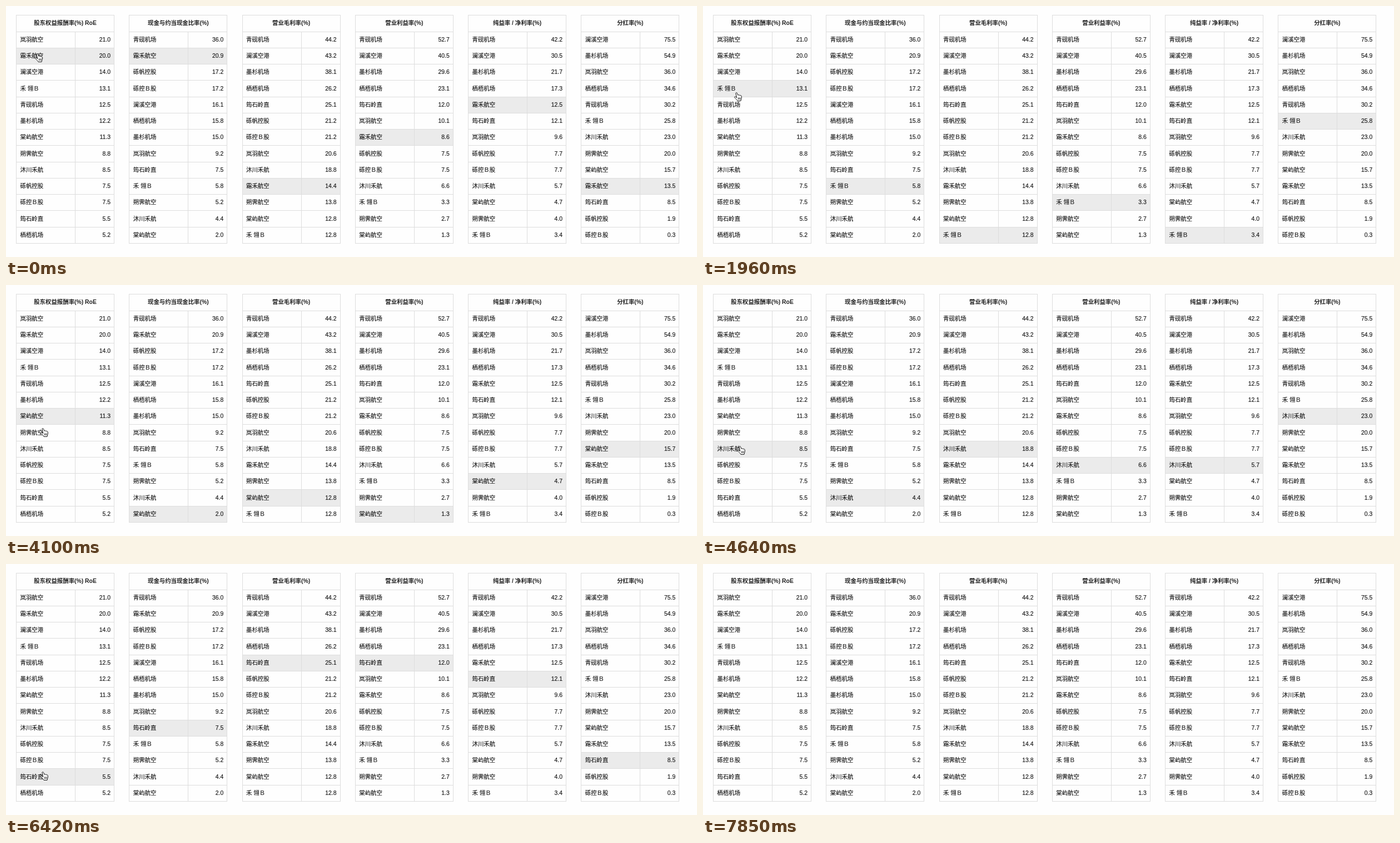
Write an HTML page that moves like this. It is 1243 px wide and 451 px high and loops after 8590 ms.

```html
<!DOCTYPE html>
<html lang="zh-CN">
<head>
<meta charset="utf-8">
<title>财务比率对比</title>
<style>
  html, body { margin: 0; width: 100%; height: 100%; overflow: hidden; background: #fefefe; }
  svg { display: block; }
  text {
    font: 10.4px "Liberation Sans", "Noto Sans CJK SC", "Noto Sans CJK", sans-serif;
    fill: #161616; stroke: #161616; stroke-width: 0.15;
  }
  .head { font-weight: 700; text-anchor: middle; fill: #222; stroke: none; }
  .num { text-anchor: end; }
  .line { fill: #ddd; }
  .hover { fill: #ebebeb; }
</style>
</head>
<body>
<svg id="stage" width="1243" height="451" viewBox="0 0 1243 451"></svg>
<script>
const LOOP = 8590, TICK = 178.1;
const PITCH = 29.25, WIDTH = 176, SPLIT = 106;

const titles = ['股东权益报酬率(%) RoE', '现金与约当现金比率(%)', '营业毛利率(%)',
  '营业利益率(%)', '纯益率 / 净利率(%)', '分红率(%)'];

// One company per line, one ratio per table; each table sorts by its own ratio.
const companies = `岚羽航空|21.0 9.2 20.6 10.1 9.6 36.0
霜禾航空|20.0 20.9 14.4 8.6 12.5 13.5
澜溪空港|14.0 16.1 43.2 40.5 30.5 75.5
禾 翎Ｂ|13.1 5.8 12.8 3.3 3.4 25.8
青砚机场|12.5 36.0 44.2 52.7 42.2 30.2
墨杉机场|12.2 15.0 38.1 29.6 21.7 54.9
棠屿航空|11.3 2.0 12.84 1.3 4.7 15.7
朔霁航空|8.8 5.2 13.8 2.7 4.0 20.0
沐川禾航|8.5 4.4 18.8 6.6 5.7 23.0
砾帆控股|7.5 17.2 21.2 7.5 7.7 1.9
砾控Ｂ股|7.5 17.2 21.2 7.5 7.7 0.3
筠石岭直|5.5 7.5 25.1 12.0 12.1 8.5
栖梧机场|5.2 15.8 26.2 23.1 17.3 34.6`.split('\n').map(line => {
  const [name, ratios] = line.split('|');
  return { name, ratios: ratios.split(' ').map(Number) };
});
const ROWS = companies.length;

// Pointer path: [tick, y], straight between the points.
const path = [[0, 86], [1, 88], [2, 88], [8, 147], [9, 147], [11, 156], [13, 183], [16, 183],
  [17, 185], [21, 238], [22, 238], [23, 258], [25, 282], [26, 290], [35, 370], [36, 374],
  [40, 411], [41, 411], [44, 470]];

const stage = document.getElementById('stage');

function add(tag, attrs, parent = stage, text = '') {
  const el = document.createElementNS('http://www.w3.org/2000/svg', tag);
  for (const key in attrs) el.setAttribute(key, attrs[key]);
  el.textContent = text;
  parent.append(el);
  return el;
}
const rect = (cls, x, y, width, height) => add('rect', { class: cls, x, y, width, height });
const label = (cls, x, y, text) => add('text', { class: cls, x, y }, stage, text);
const lineY = row => Math.round(45.5 + PITCH * row);

const tables = titles.map((title, i) => {
  const left = 18.2 + 203.25 * i, x = Math.round(left);
  const top = lineY(-1), bottom = lineY(ROWS);
  const order = [...companies].sort((a, b) => b.ratios[i] - a.ratios[i]);
  const bar = rect('hover', x + 1, 0, WIDTH - 1, 0);
  for (let row = -1; row <= ROWS; row++) rect('line', x, lineY(row), WIDTH + 1, 1);
  for (const dx of [0, WIDTH]) rect('line', x + dx, top, 1, bottom - top + 1);
  rect('line', x + SPLIT, lineY(0), 1, bottom - lineY(0));

  label('head', left + WIDTH / 2 + 0.4, 34.4, title);
  order.forEach((company, row) => {
    const y = Math.round(63.9 + PITCH * row);
    label('name', left + 7.4, y, company.name);
    label('num', left + 169.8, y, company.ratios[i].toFixed(1));
  });
  return { bar, order };
});

const hand = add('g', { stroke: '#111', 'stroke-width': 1, 'stroke-linejoin': 'round', 'stroke-linecap': 'round' });
add('path', {
  fill: '#fff',
  d: 'M3 1.6C3.1.3 5 .2 5.5 1.5L6.9 5.3C7.5 4.5 8.8 4.6 9.2 5.5C9.8 4.8 11 5.1 11.3 6.1' +
     'C12.2 5.6 13.2 6.1 13.3 7.2V10C13.3 12 12.1 13.2 12 15.4H6C5.6 13.8 3.6 12.4.9 9.5' +
     'C.1 8.4 1.3 7.3 2.4 8L4.4 9.4Z'
}, hand);
add('path', { fill: 'none', 'stroke-width': 0.8, d: 'M7.4 9.8V12.8M9.2 9.8V12.8M11 9.8V12.8' }, hand);

function pointerY(tick) {
  const next = path.findIndex(point => point[0] > tick);
  if (next < 0) return path[path.length - 1][1];
  const [t0, y0] = path[next - 1], [t1, y1] = path[next];
  return y0 + (y1 - y0) * (tick - t0) / (t1 - t0);
}

function show(tick) {
  const y = pointerY(tick);
  const x = Math.min(66, Math.floor(56 + (y - 86) * 0.0582));
  hand.setAttribute('transform', `translate(${x - 4} ${Math.round(y) - 1})`);

  // The highlight trails the pointer by one tick.
  const hovered = companies[Math.floor((pointerY(Math.max(0, tick - 1)) - 46) / PITCH)];
  for (const { bar, order } of tables) {
    const row = order.indexOf(hovered);
    bar.setAttribute('y', lineY(row) + 1);
    bar.setAttribute('height', row < 0 ? 0 : lineY(row + 1) - lineY(row) - 1);
  }
}

const start = performance.now();
let shown = -1;
function frame() {
  const tick = Math.floor((performance.now() - start) % LOOP / TICK);
  if (tick !== shown) show(shown = tick);
  requestAnimationFrame(frame);
}
frame();
</script>
</body>
</html>
```
